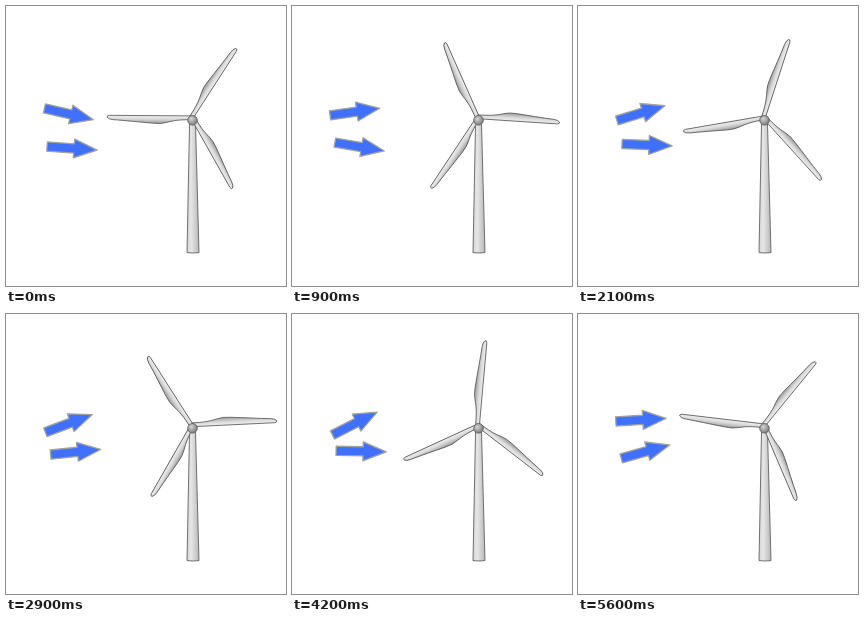
An HTML page for the animation above (5.7 s loop, 280 px wide and 280 px high).

```html
<!DOCTYPE html>
<html lang="en">
<head>
<meta charset="utf-8">
<title>Wind turbine</title>
<style>
html, body { margin: 0; width: 100%; height: 100%; overflow: hidden; background: #fff; }
svg { display: block; width: 100vw; height: 100vh; }
.metal { stroke: #5c5c5c; stroke-width: .85; stroke-linejoin: round; }
.arrow { fill: #4070ff; stroke: #a3a39c; stroke-width: 1.3; stroke-linejoin: round; }
</style>
</head>
<body>
<svg viewBox="0 0 280 280">
  <defs>
    <linearGradient id="towerFill">
      <stop offset="0" stop-color="#d4d4d4"/>
      <stop offset=".35" stop-color="#e6e6e6"/>
      <stop offset="1" stop-color="#b8b8b8"/>
    </linearGradient>
    <linearGradient id="bladeFill" x1="0" y1="1" x2="0" y2="0">
      <stop offset="0" stop-color="#f0f0f0"/>
      <stop offset=".45" stop-color="#d8d8d8"/>
      <stop offset="1" stop-color="#999"/>
    </linearGradient>
    <radialGradient id="hubFill" cx=".38" cy=".35" r=".7">
      <stop offset="0" stop-color="#d4d4d4"/>
      <stop offset="1" stop-color="#777"/>
    </radialGradient>
  </defs>
  <path class="metal" fill="url(#towerFill)" d="M183.6 114H189.4L193 246.6Q187 247.4 181 246.6Z"/>
  <g id="rotor"></g>
  <circle class="metal" fill="url(#hubFill)" cx="186.5" cy="114.3" r="4.8"/>
  <g id="arrows"></g>
</svg>
<script>
const STEP = 100, COUNT = 57;
const { sin, cos } = Math;
const rotor = document.getElementById('rotor');
const arrowLayer = document.getElementById('arrows');

function addPath(parent, cls, d) {
  const el = document.createElementNS('http://www.w3.org/2000/svg', 'path');
  el.setAttribute('class', cls);
  el.setAttribute('d', d);
  parent.append(el);
  return el;
}

// The blade lies along +x: straight edge below, belly above, slanted tip.
function addBlade(len, angle) {
  const el = addPath(rotor, 'metal',
    `M0 1.4L${len - 2} 1.4Q${len + .6} 1.2 ${len} -.6Q${len - 1.5} -2.6 ${len - 6} -2.9` +
    `C${len - 18} -3.6 ${len - 30} -5 38 -6.2Q31 -7 25 -5.2C18 -3.2 12 -2.4 0 -2.4Z`);
  el.setAttribute('fill', 'url(#bladeFill)');
  el.setAttribute('transform', `rotate(${angle})`);
}
addBlade(84.8, 180.4);
addBlade(81.6, 302.9);
addBlade(81.6, 60.6);

// Each gust drifts and wavers over the loop, p running from 0 to 1.
const gusts = [
  p => ({
    x: 62.8,
    y: 108 - 2.3 * sin(7.5 * p),
    angle: 13 - 39 * sin(2.7 * p) - 5 * sin(10 * p)
  }),
  p => ({
    x: 66 + 3.5 * sin(2.8 * p),
    y: 142.3 - 5 * sin(2 * p),
    angle: 10 - 20 * p - 6 * cos(13 * p)
  })
];
const arrows = gusts.map(() =>
  addPath(arrowLayer, 'arrow', 'M-25 -4.6H2V-9.5L25.2 0L2 9.5V4.6H-25Z'));

function draw(ms) {
  const p = Math.floor(ms / STEP) % COUNT / COUNT;
  rotor.setAttribute('transform', `translate(186 111.3) rotate(${-360 * p})`);
  arrows.forEach((el, i) => {
    const { x, y, angle } = gusts[i](p);
    el.setAttribute('transform', `translate(${x} ${y}) rotate(${angle})`);
  });
}

const start = performance.now();
function tick() {
  draw(performance.now() - start);
  requestAnimationFrame(tick);
}
tick();
</script>
</body>
</html>
```
